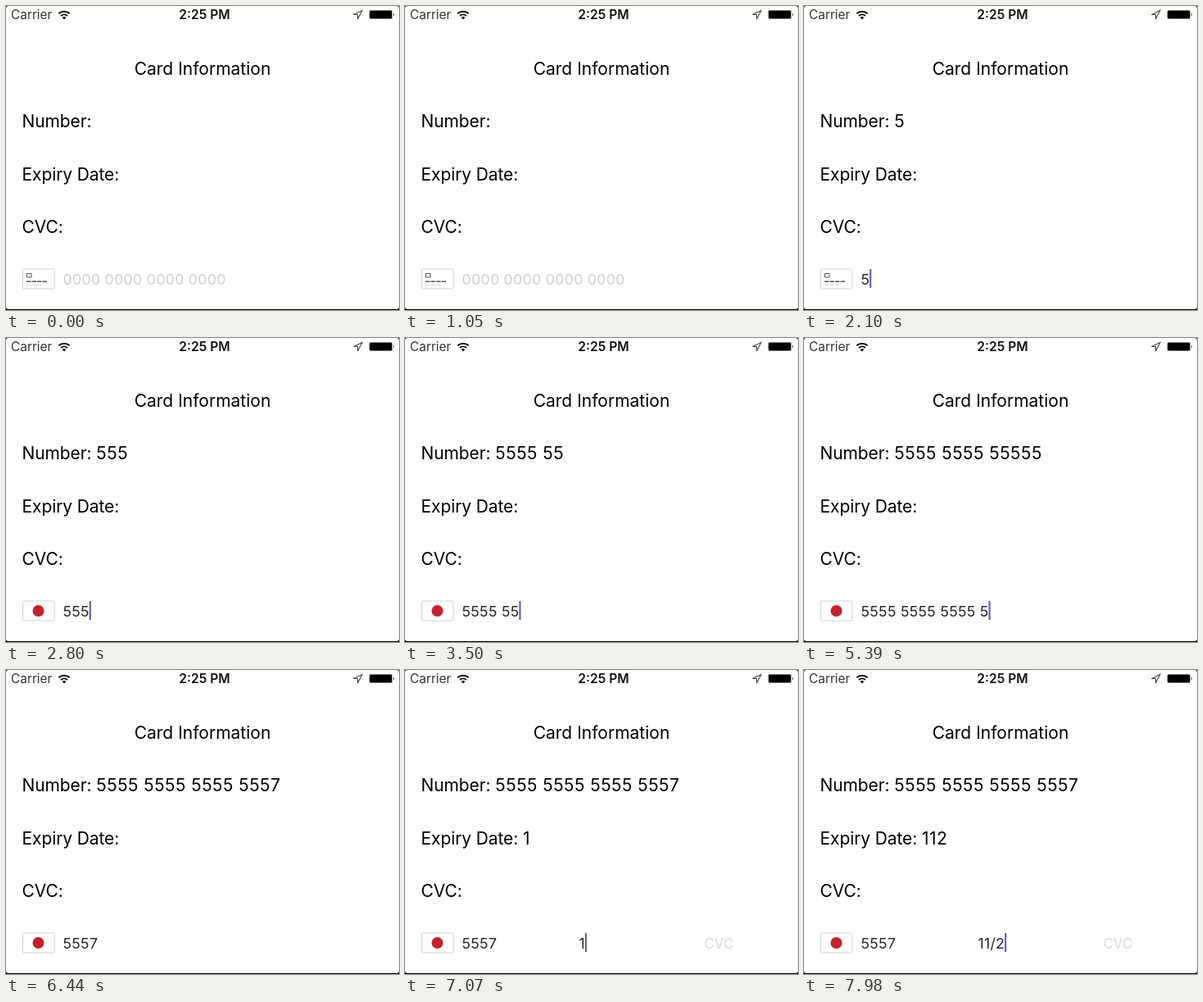
Write an HTML page that moves like this. It is 480x371 px and loops after 8000 ms.

```html
<!DOCTYPE html>
<html lang="en">
<head>
<meta charset="utf-8">
<style>
  html, body { margin: 0; width: 100%; height: 100%; overflow: hidden; background: #000; }
  svg { display: block; width: 100vw; height: 100vh; }
  text { font-family: Inter, Roboto, sans-serif; white-space: pre; }
  .label { font-size: 21px; fill: #000; letter-spacing: -.1px; }
  .label tspan { letter-spacing: .45px; }
  .field, .hint { font-size: 17.8px; letter-spacing: .25px; }
  .field { fill: #26262a; }
  .hint { fill: #cfcfd2; }
  .status { font-size: 15.4px; fill: #333; }
  .clock { font-size: 15.6px; font-weight: 600; fill: #111; text-anchor: middle; }
</style>
</head>
<body>
<svg viewBox="0 0 480 371">
  <clipPath id="entry"><rect x="64" y="315" width="416" height="40"/></clipPath>
  <rect width="480" height="370" rx="3" fill="#fff"/>

  <text class="status" x="6" y="16.2">Carrier</text>
  <g fill="none" stroke="#111" stroke-width="2">
    <path d="M64.4 9.3a9.6 9.6 0 0 1 13.2 0"/>
    <path d="M67 12.1a6 6 0 0 1 8 0"/>
  </g>
  <path d="M71 16.6l-2.4-2.5a3.5 3.5 0 0 1 4.8 0z" fill="#111"/>
  <text class="clock" x="242.5" y="16.4">2:25 PM</text>
  <path d="M435 5.5l-10.5 5h5v5.5z" fill="none" stroke="#444" stroke-width="1.1"/>
  <rect x="443.5" y="5" width="28.5" height="11" rx="2" fill="#777"/>
  <rect x="444.5" y="6" width="26.5" height="9" rx="1" fill="#000"/>
  <path d="M473 8.5q2 2 0 4z" fill="#333"/>

  <text class="label" x="240" y="83.5" text-anchor="middle" style="letter-spacing:0">Card Information</text>
  <text class="label" x="19.5" y="148.2">Number: <tspan id="number"></tspan></text>
  <text class="label" x="19.5" y="212.5">Expiry Date: <tspan id="expiry"></tspan></text>
  <text class="label" x="19.5" y="276.8">CVC:</text>

  <rect x="20.5" y="321" width="38.5" height="24" rx="1.5" fill="#fff" stroke="#d2d2d2"/>
  <g id="blank" fill="none">
    <path d="M25.5 326.5h5.5v4.5h-5.5z" stroke="#555"/>
    <path d="M25 336.3h25" stroke="#555" stroke-width="1.6" stroke-dasharray="5.5 1"/>
    <path d="M25 340.5h19" stroke="#ddd"/>
  </g>
  <circle id="badge" cx="39.5" cy="333" r="7" fill="#c5202c"/>

  <g clip-path="url(#entry)">
    <text class="hint" x="69.5" y="339.5" id="numberHint">0000 0000 0000 0000</text>
    <text class="field" y="339.5" id="head">5555 5555 5555 </text>
    <text class="field" y="339.5" id="digits"></text>
  </g>
  <text class="hint" x="212.5" y="339.5" id="dateHint">00/00</text>
  <text class="field" x="212.5" y="339.5" id="date"></text>
  <text class="hint" x="365.5" y="339.5" id="cvcHint" style="font-size:16.6px">CVC</text>
  <rect id="caret" y="321" width="2.2" height="23" fill="#6364b2"/>
</svg>
<script>
const LOOP = 8000, LEFT = 69.5, DATE_LEFT = 212.5, SHIFT = 146;
const CARD = "5555555555555557";
const cardKeys = [2100, 2450, 2730, 2940, 3150, 3430, 3640, 3850,
                  4130, 4410, 4690, 4970, 5390, 5670, 5880, 6160];
const dateKeys = [7000, 7630, 7910];

const $ = id => document.getElementById(id);
const typed = (keys, t) => keys.filter(k => k <= t).length;
const ramp = (t, a, b) => Math.min(1, Math.max(0, (t - a) / (b - a)));
const group = s => s.replace(/(.{4})(?=.)/g, "$1 ");
const fade = (id, v) => $(id).setAttribute("opacity", v);
const write = (id, s) => { if ($(id).textContent !== s) $(id).textContent = s; };

function draw(t) {
  const n = typed(cardKeys, t), m = typed(dateKeys, t);
  const month = "112".slice(0, m);
  // A digit that opens a new group stays joined in the label until the next key.
  const number = group(CARD.slice(0, n));
  write("number", n % 4 === 1 ? number.replace(/ (.)$/, "$1") : number);
  write("expiry", month);

  // The last digit reaches the field as the slide begins.
  const sliding = t >= 6230, p = ramp(t, 6230, 6440), slide = p * p * (3 - 2 * p);
  write("digits", sliding ? CARD.slice(12) : group(CARD.slice(0, Math.min(n, 15))));
  $("digits").setAttribute("x", LEFT + (sliding ? SHIFT * (1 - slide) : 0));
  $("head").setAttribute("x", LEFT - SHIFT * slide);
  fade("head", sliding ? 1 - slide : 0);
  write("date", m < 2 ? month : "11/" + month.slice(2));

  const shown = ramp(t, 6440, 6860);
  fade("numberHint", n ? 0 : 1);
  fade("dateHint", m ? 0 : shown);
  fade("cvcHint", shown * .8);
  const brand = ramp(t, 2450, 2660);
  fade("blank", 1 - brand);
  fade("badge", brand);

  const inDate = t > 6500;
  const box = $(inDate ? "date" : "digits");
  $("caret").setAttribute("x", (inDate ? DATE_LEFT : LEFT) + box.getComputedTextLength() - .2);
  fade("caret", t >= 1750 && (inDate || !sliding) ? 1 : 0);
}

function tick() {
  draw(performance.now() % LOOP);
  requestAnimationFrame(tick);
}
tick();
</script>
</body>
</html>
```
